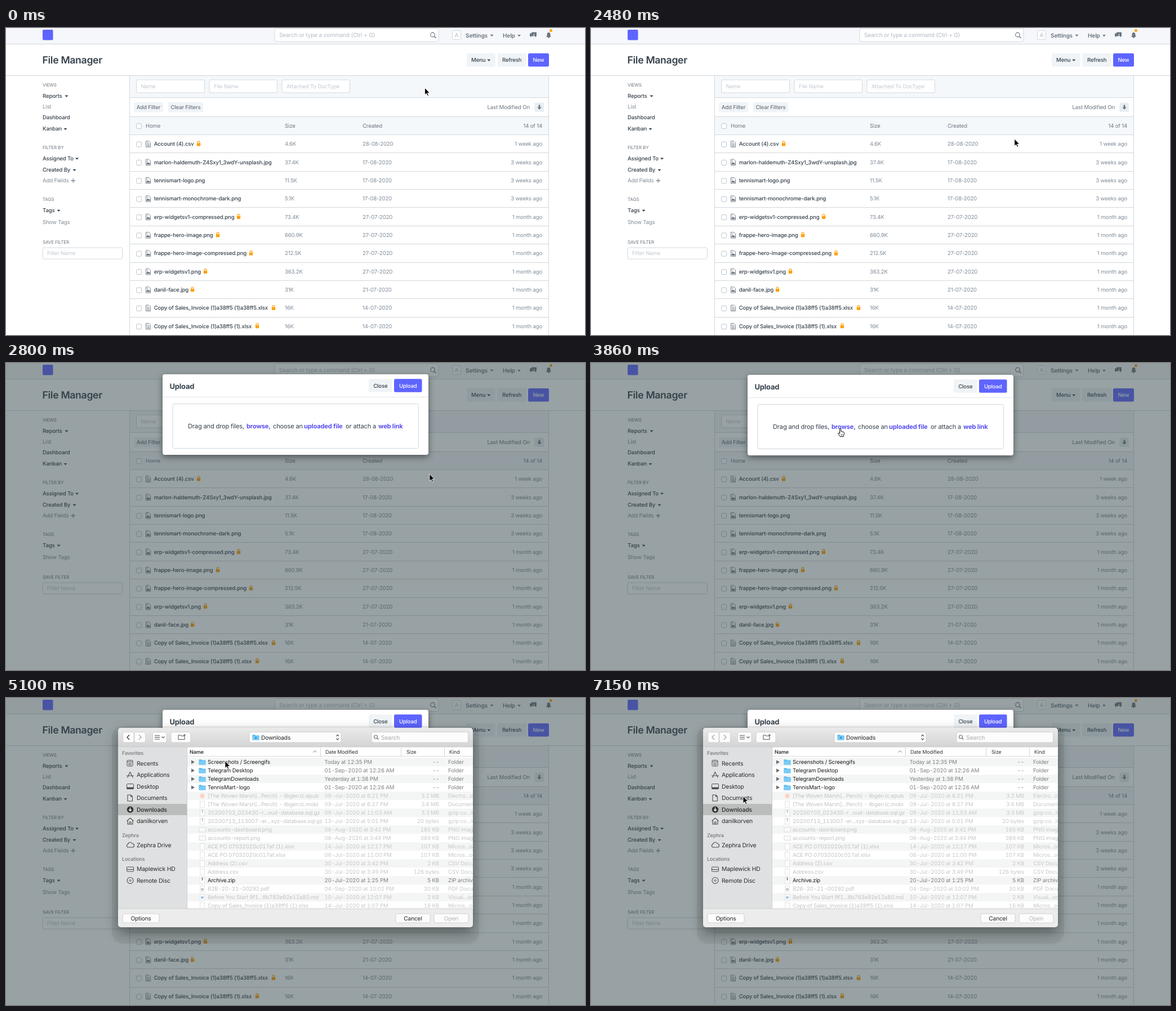
Recreate the animation shown at these times as an HTML page. Size 1028 by 545 pixels, loop 8 s.

```html
<!DOCTYPE html>
<html lang="en">
<head>
<meta charset="utf-8">
<title>File Manager</title>
<style>
  html, body { margin: 0; width: 100%; height: 100%; overflow: hidden; background: #fff; }
  svg { display: block; width: 100vw; height: 100vh; }
  text {
    font-family: Inter, "Open Sans", sans-serif; letter-spacing: -0.017em;
    white-space: pre; text-rendering: geometricPrecision;
  }
  .tab text { font-variant-numeric: tabular-nums; }
  #menuBox { filter: drop-shadow(0 4px 5px rgba(0,0,0,.22)); }
  #modalBox { filter: drop-shadow(0 4px 6px rgba(0,0,0,.45)); }
  #dialogBox { filter: drop-shadow(0 9px 11px rgba(0,0,0,.4)); }
</style>
</head>
<body>
<svg id="stage" viewBox="0 0 1028 545" preserveAspectRatio="none" xmlns="http://www.w3.org/2000/svg"></svg>
<script>
const DARK = '#36414c', GREY = '#7f8c99', SLATE = '#6c7680', LINE = '#d1d8dd',
      PALE = '#f0f4f7', BLUE = '#5e64ff', BAND = '#f5f8fb', HINT = '#c3cad1', ORANGE = '#ffa00a';

// y is the vertical centre of the text
const text = (x, y, str, fill = DARK, size = 9.6, weight = 400, anchor = 'start') =>
  `<text x="${x}" y="${(y + size * 0.36).toFixed(2)}" fill="${fill}" font-size="${size}" font-weight="${weight}" text-anchor="${anchor}">${str}</text>`;
const rect = (x, y, x2, y2, fill, r = 0, stroke = 'none', extra = '') =>
  `<rect x="${x}" y="${y}" width="${x2 - x}" height="${y2 - y}" rx="${r}" fill="${fill}" stroke="${stroke}" ${extra}/>`;
const path = (d, fill = 'none', stroke = 'none', w = 1, extra = '') =>
  `<path d="${d}" fill="${fill}" stroke="${stroke}" stroke-width="${w}" ${extra}/>`;
const circle = (x, y, r, fill, stroke = 'none', w = 1) =>
  `<circle cx="${x}" cy="${y}" r="${r}" fill="${fill}" stroke="${stroke}" stroke-width="${w}"/>`;
const group = (id, body) => `<g id="${id}">${body}</g>`;
const hline = (x, x2, y, c = LINE) => path(`M${x} ${y}H${x2}`, 'none', c);
const caret = (x, y, c = DARK) => path(`M${x - 3} ${y - 1.3}h6l-3 3.2z`, c);
const field = (x, y, x2, y2, hint, size = 9.6, color = HINT) =>
  rect(x, y, x2, y2, '#fff', 2.5, LINE) + text(x + 8, (y + y2) / 2, hint, color, size);
const button = (id, x, y, x2, y2, label, fill = PALE, color = DARK, dx = 0) =>
  rect(x, y, x2, y2, fill, 2.5, 'none', id && `id="${id}"`) +
  text((x + x2) / 2 + dx, (y + y2) / 2, label, color, 9.6, 500, 'middle');
const lens = (x, y, r, c) => circle(x, y, r, 'none', c, 1.2) +
  path(`M${x + r * .7} ${y + r * .7}l${r * .9} ${r * .9}`, 'none', c, 1.4);

function navbar() {
  return rect(0, 0, 1028, 28, '#f5f7fa') + hline(0, 1028, 28.5) +
    rect(65, 3, 83.5, 21.5, BLUE, 2) +
    field(477, 1, 768, 24, 'Search or type a command (Ctrl + G)', 10.1, '#b3bbc3') +
    lens(757.5, 12, 3.8, SLATE) +
    rect(792.5, 4.5, 807.5, 20.5, '#fbfcfd', 2, LINE) + text(800, 12.8, 'A', '#b3bbc3', 9.6, 400, 'middle') +
    text(816, 13, 'Settings', SLATE, 10.1, 600) + caret(862.5, 13, SLATE) +
    text(882, 13, 'Help', SLATE, 10.1, 600) + caret(911, 13.4, SLATE) +
    path('M933 7.5h9v7h-1v2l-2-2h-1v-4h-5z', SLATE) + path('M930 9.5h7v5h-4l-2 2v-2h-1z', SLATE) +
    path('M959 16c1.5-1.5 1.5-2.5 1.5-4.5 0-5 6-5 6 0 0 2 0 3 1.5 4.5z', SLATE) +
    circle(963.5, 16.6, 1.3, SLATE) + circle(967.5, 4.5, 2.5, ORANGE);
}

function head() {
  return text(64.5, 57, 'File Manager', DARK, 17.6, 600) + hline(0, 1028, 84.5) +
    button('menuBtn', 818, 45, 868.5, 68.5, 'Menu', PALE, DARK, -4.5) + caret(857.3, 57) +
    button('refreshBtn', 872.5, 45, 924, 68.5, 'Refresh') +
    button('', 927, 45, 964, 68.5, 'New', BLUE, '#fff');
}

function sidebar() {
  // y, label, caret x; entries without a third value are muted
  const items = [[120.5, 'Reports', 107.5], [139.7, 'List'], [158.8, 'Dashboard', 0], [179, 'Kanban', 105.5],
    [231.5, 'Assigned To', 126], [251.8, 'Created By', 121.5], [271, 'Add Fields'],
    [323.7, 'Tags', 93.5], [345, 'Show Tags']];
  const titles = [[101.5, 'VIEWS'], [212.5, 'FILTER BY'], [304.5, 'TAGS'], [380.5, 'SAVE FILTER']];
  return titles.map(([y, s]) => text(65, y, s, SLATE, 8)).join('') +
    items.map(([y, s, cx]) => {
      const muted = cx === undefined;
      return text(65, y, s, muted ? GREY : DARK, 9.6, muted ? 400 : 500) + (cx ? caret(cx, y + .3) : '');
    }).join('') +
    path('M115.5 271h7.5m-3.75-3.75v7.5', 'none', GREY, 1.3) +
    field(65, 390, 206.5, 410, 'Filter Name');
}

const checkbox = y => rect(231.7, y - 4.3, 240.7, y + 4.7, '#fff', 2, '#b9c2ca');
const lock = (x, y) => rect(x - 3.2, y - 1.2, x + 3.2, y + 4, ORANGE, .8) +
  path(`M${x - 2} ${y - 1}v-1.3a2 2 0 0 1 4 0v1.3`, 'none', ORANGE, 1.2);
function fileIcon(y, image) {
  const page = path(`M248.5 ${y - 5}h5l3 3v7.5h-8z`, 'none', SLATE, .9);
  return page + (image
    ? path(`M249.5 ${y + 4}v-1.5l2-3 1.7 2 1-1 1.4 2v1.5z`, SLATE) + circle(251, y - 2, .8, SLATE)
    : path(`M250 ${y - 2}h3m-3 2h5m-5 2h5m-5 1.8h5`, 'none', SLATE, .8));
}

// name, lock x, size, date, age
const files = [
  ['Account (4).csv', 342, '4.6K', '28-08-2020', '1 week ago'],
  ['marlon-haldemuth-Z4Sxy1_3wdY-unsplash.jpg', 0, '37.4K', '17-08-2020', '3 weeks ago'],
  ['tennismart-logo.png', 0, '11.5K', '17-08-2020', '3 weeks ago'],
  ['tennismart-monochrome-dark.png', 0, '5.1K', '17-08-2020', '3 weeks ago'],
  ['erp-widgetsv1-compressed.png', 413, '73.4K', '27-07-2020', '1 month ago'],
  ['frappe-hero-image.png', 376, '660.9K', '27-07-2020', '1 month ago'],
  ['frappe-hero-image-compressed.png', 435, '212.5K', '27-07-2020', '1 month ago'],
  ['erp-widgetsv1.png', 354, '363.2K', '27-07-2020', '1 month ago'],
  ['danil-face.jpg', 331, '31K', '21-07-2020', '1 month ago'],
  ['Copy of Sales_Invoice (1)a38ff5 (1)a38ff5.xlsx', 475, '16K', '14-07-2020', '1 month ago'],
  ['Copy of Sales_Invoice (1)a38ff5 (1).xlsx', 446, '16K', '14-07-2020', '1 month ago']];

function list() {
  const rows = files.map(([name, lockX, size, date, age], i) => {
    const y = 205.8 + i * 32.35;
    return checkbox(y + .6) + fileIcon(y, /png|jpg/.test(name)) + text(262.7, y, name, DARK, 9.6, 500) +
      (lockX ? lock(lockX, y - .3) : '') + text(495, y, size, GREY) + text(633, y, date, GREY) +
      text(952, y, age, GREY, 9.6, 400, 'end') + hline(219, 964, Math.round(y + 15.6) + .5);
  }).join('');
  return rect(219, 85, 964, 123, BAND) + rect(219, 158, 964, 189, BAND) +
    [123.5, 157.5, 189.5].map(y => hline(219, 964, y)).join('') +
    path('M219.5 85V545M963.5 85V545', 'none', LINE) +
    field(231.5, 92, 352.5, 115, 'Name') + field(361, 92, 481.5, 115, 'File Name') +
    field(490, 92, 610.5, 115, 'Attached To DocType') +
    button('', 227, 132, 279, 149.5, 'Add Filter', PALE, SLATE) +
    button('', 288, 132, 350, 149.5, 'Clear Filters', PALE, SLATE) +
    text(930, 141, 'Last Modified On', SLATE, 9.7, 400, 'end') +
    rect(938.5, 132.5, 955, 149, '#e9eef2', 2) +
    path('M945.7 136.5h2.6v4.2h2.4l-3.7 4-3.7-4h2.4z', SLATE) +
    checkbox(174) + text(248, 174, 'Home', SLATE) + text(495, 174, 'Size', SLATE) +
    text(633, 174, 'Created', SLATE) + text(952, 174, '14 of 14', SLATE, 9.6, 400, 'end') + rows;
}

function menu() {
  const items = ['Home', 'New Folder', 'Toggle Grid View', 'Import Zip', 'Import', 'User Permissions',
    'Role Permissions Manager', 'Customize', 'Toggle Sidebar', 'Share URL', 'Edit DocType'];
  const keys = { 7: 'J', 8: 'K', 9: 'L' };
  return rect(712, 70, 868.5, 464, '#fff', 3, 'none', 'id="menuBox"') + hline(712, 868, 213.5) +
    items.map((s, i) => text(723, 89 + i * 35.75, s, DARK, 9.6, 500) +
      (keys[i] ? text(857, 89 + i * 35.75, '⌘+' + keys[i], GREY, 9.6, 400, 'end') : '')).join('') +
    rect(861, 72, 867, 427, '#000', 3, 'none', 'id="thumb"');
}

function modal() {
  const parts = [[323, 'Drag and drop files,'], [427, 'browse,', 1], [474, 'choose an'],
    [529, 'uploaded file', 1], [603, 'or attach a'], [661, 'web link', 1]];
  return rect(278, 21, 750, 164, '#fff', 4, 'none', 'id="modalBox"') + hline(278, 750, 61.5, '#e1e6ea') +
    text(290.5, 42.3, 'Upload', DARK, 13, 700) +
    button('', 644, 29.3, 685.5, 52.8, 'Close') + button('', 689, 29.3, 738.5, 52.8, 'Upload', BLUE, '#fff') +
    rect(296, 73.5, 732.5, 152.5, '#fff', 3, LINE) +
    parts.map(([x, s, link]) => text(x, 113.3, s, link ? '#5a50f0' : DARK, 11.15, link ? 700 : 400)).join('');
}

const entries = `Screenshots / Screengifs|Today at 12:35 PM|--|Folder
Telegram Desktop|01-Sep-2020 at 12:26 AM|--|Folder
TelegramDownloads|Yesterday at 1:38 PM|--|Folder
TennisMart-logo|01-Sep-2020 at 12:26 AM|--|Folder
[The Woven Marsh]...Perch) - libgen.lc.epub|09-Jul-2020 at 8:21 PM|3.2 MB|Electro...ook
[The Woven Marsh]...Perch) - libgen.lc.mobi|09-Jul-2020 at 8:27 PM|3.6 MB|Document
20200703_023430-r...oud-database.sql.gz|09-Jul-2020 at 11:03 AM|3.3 MB|gzip co...ive
20200713_113007-er...xyz-database.sql.gz|13-Jul-2020 at 5:01 PM|20 bytes|gzip co...ive
accounts-dashboard.png|06-Aug-2020 at 3:41 PM|185 KB|PNG image
accounts-report.png|06-Aug-2020 at 3:44 PM|389 KB|PNG image
ACE PO 07032020c017af (1).xlsx|14-Jul-2020 at 12:17 PM|107 KB|Micros...ook
ACE PO 07032020c017af.xlsx|06-Jul-2020 at 11:00 PM|107 KB|Micros...ook
Address (2).csv|30-Jul-2020 at 3:42 PM|2 KB|CSV Document
Address.csv|30-Jul-2020 at 3:49 PM|126 bytes|CSV Document
Archive.zip|20-Jul-2020 at 1:25 PM|5 KB|ZIP archive
B2B-20-21-00292.pdf|04-Sep-2020 at 10:02 PM|30 KB|PDF Document
Before You Start 9f1...8b763e92e12a80.md|10-Jul-2020 at 12:07 PM|2 KB|Visual...ocu
Copy of Sales_Invoice (1)a38ff5 (1).xlsx|14-Jul-2020 at 1:07 PM|16 KB|Micros...ook`.split('\n').map(l => l.split('|'));

const folder = (x, y) => path(`M${x - 6} ${y - 4.5}h4.5l1 1.2h6.5v8h-12z`, '#58b9ee') +
  rect(x - 6, y - 2, x + 6, y + 4.7, '#7accf5', .8);

function entryIcon(name, y) {
  if (/epub/.test(name)) return circle(348.5, y, 4, '#fbd3bb');
  if (/png/.test(name)) return rect(343, y - 4, 354.5, y + 4, '#fafafa', 0, '#dcdcdc');
  const page = rect(344.5, y - 5.5, 352.5, y + 5.5, '#fdfdfd', 0, '#dedede', 'stroke-width=".8"');
  if (/gz|zip/.test(name)) return page + path(`M348.5 ${y - 5}v5`, 'none', /zip/.test(name) ? '#555' : '#aaa', 1.3);
  if (/pdf/.test(name)) return page + circle(348.5, y + 1, 2.5, '#c2c5ca');
  if (/md/.test(name)) return page + rect(346.5, y - 1.5, 350.5, y + 2.5, '#8fc0ea');
  return page;
}

function browser() {
  const rows = entries.map(([name, date, size, kind], i) => {
    const y = 113.7 + i * 15, dir = kind === 'Folder', on = dir || /zip/.test(name);
    const a = on ? '#1d1d1d' : '#c3c3c3', b = on ? '#808080' : '#c8c8c8';
    return (i % 2 ? '' : rect(322, y - 7.5, 829, y + 7.5, '#f4f5f5')) +
      (dir ? path(`M329 ${y - 3.5}l6 3.5l-6 3.5z`, '#6e6e6e') + folder(348.5, y) : entryIcon(name, y)) +
      text(358, y, name, a, 9.7) + text(565.5, y, date, b, 9.7) +
      text(769, y, size, b, 9.7, 400, 'end') + text(785, y, kind, b, 9.7);
  }).join('');
  const heads = [[326, 'Name'], [567, 'Date Modified'], [711, 'Size'], [787, 'Kind']];
  return `<g clip-path="url(#pane)" class="tab">` + rect(322, 87, 829, 374, '#fff') + rows +
    hline(322, 829, 103.5, '#d9d9d9') + path('M558.5 88v15M701.5 88v15M778.5 88v15', 'none', '#d4d4d4') +
    heads.map(([x, s], i) => text(x, 95.3, s, '#333', 9, i ? 400 : 600)).join('') +
    path('M545.5 96.5l3-3 3 3', 'none', '#777') + '</g>';
}

function places() {
  const c = '#4c4c4c', ink = d => path(d, 'none', c, 1.1);
  const labels = [[98, 'Favorites'], [244, 'Zephra'], [286, 'Locations']];
  const items = [
    [116, 'Recents', rect(215, 110.5, 225, 121, 'none', 1.5, c) + ink('M215 113h10M217 116h6M217 118.5h6')],
    [136.5, 'Applications', ink('M220.5 131l-5 10.5M220 131l5.5 10.5M214 138h13')],
    [157, 'Desktop', rect(214.5, 152.5, 226.5, 161.5, 'none', 1, c) + rect(214.5, 158.5, 226.5, 161.5, c)],
    [177.5, 'Documents', ink('M216 172h5.5l3 3v8h-8.5zM221.5 172v3h3')],
    [198, 'Downloads', circle(220.5, 198, 5.8, '#333') + path('M220.5 194.5v6m-2.5-2.5l2.5 2.5 2.5-2.5', 'none', '#fff', 1.3)],
    [218.5, 'danilkorven', ink('M214.5 218.5l6-5.5 6 5.5M216 217.5v6.5h9v-6.5M219.2 224v-4h2.6v4')],
    [261, 'Zephra Drive', ink('M217 265a2.8 2.8 0 0 1-.5-5.5 4.2 4.2 0 0 1 7.8-1 3.3 3.3 0 0 1 .7 6.5z')],
    [303.7, 'Maplewick HD', rect(214.5, 300, 226.5, 308, 'none', 1, c) + ink('M214.5 304.5h12')],
    [324.2, 'Remote Disc', circle(220.5, 324, 5.5, 'none', c, 1.1) + circle(220.5, 324, 1.5, 'none', c)]];
  return rect(199, 188, 321, 208, '#bbbcbc') +
    labels.map(([y, s]) => text(206, y + .2, s, '#757575', 9, 500)).join('') +
    items.map(([y, s, icon]) => icon + text(232, y, s, '#2b2b2b', 10.4, s === 'Downloads' ? 500 : 400)).join('');
}

function dialog() {
  const box = (x, x2, y = 60.5, y2 = 79) => rect(x, y, x2, y2, '#fcfcfc', 3, '#cbcacb', 'stroke-width=".8"');
  const tool = '#5f5f5f';
  const push = (x, x2, s, c) => box(x, x2, 383, 399) + text((x + x2) / 2, 391.2, s, c, 10.2, 400, 'middle');
  return rect(188, 50, 840, 436, '#000', 20, 'none', 'opacity=".06"') +
    rect(199, 53, 829, 407, '#ececec', 5, 'none', 'id="dialogBox"') +
    path('M199 87V58a5 5 0 0 1 5-5H824a5 5 0 0 1 5 5V87z', 'url(#bar)') + hline(199, 829, 87, '#c6c5c6') +
    rect(199, 87.5, 321.5, 374, '#dfe0e1') + path('M321.5 87.5V374', 'none', '#cfcfcf') +
    box(207.5, 227) + box(228, 247.5) + box(260.5, 285) + box(293, 328) + box(432, 595) + box(649, 820.5) +
    path('M219 65.5l-4 4.2 4 4.2', 'none', '#444', 1.4, 'id="back"') +
    path('M236 65.5l4 4.2-4 4.2', 'none', '#a9a9a9', 1.4) +
    path('M264 66.5h9M264 69.7h9M264 73h9M276.5 68.5l2.5 2.5 2.5-2.5', 'none', tool, 1.2) +
    path('M306 73.5v-7.5h4l1 1.3h6v6.2zM317 64v4M315 66h4', 'none', tool, 1.1) +
    folder(443.5, 69.7) + circle(443.5, 70.8, 2, '#3596cf') + text(453, 70, 'Downloads', '#222', 10.2) +
    path('M586.5 68l2.2-2.8 2.2 2.8M586.5 71.5l2.2 2.8 2.2-2.8', 'none', '#444', 1.2) +
    lens(656.5, 69, 3, '#777') + text(666, 70, 'Search', '#ababab', 10.3) +
    places() + browser() + hline(199, 829, 374, '#cfcfcf') +
    push(207, 272, 'Options', '#222') + push(692, 753, 'Cancel', '#222') + push(760, 821, 'Open', '#b4b4b4');
}

const defs = `<defs>
  <linearGradient id="bar" x2="0" y2="1"><stop stop-color="#ebeaeb"/><stop offset="1" stop-color="#d5d4d5"/></linearGradient>
  <clipPath id="pane"><rect x="322" y="87.5" width="507" height="286.5"/></clipPath></defs>`;
const pointer = group('arrow', path('M0 0V12.6l2.9-2.7 2 4.5 2-.9-2-4.4h4z', '#000', '#fff', .9)) +
  group('hand', path('M-1.3 .9a1.2 1.2 0 0 1 2.4 0v4l4.2 .9c1.2 .3 1.5 1 1.3 2.2l-.8 3.6-.7 2.3h-5.6l-3.5-5.2c-.6-1.1 .6-1.9 1.5-1.1l1.2 1.2z',
    '#fff', '#000', 1) + path('M1.3 9.5v2.5M3.2 9.5v2.5', 'none', '#000', .7));

const stage = document.getElementById('stage');
stage.innerHTML = defs + rect(0, 0, 1028, 545, '#fff') + navbar() + head() + sidebar() + list() +
  group('menu', menu()) + rect(0, 0, 1028, 545, '#334448', 0, 'none', 'id="shade"') +
  group('modal', modal()) + group('dialog', dialog()) + group('cursor', pointer);
const $ = Object.fromEntries([...stage.querySelectorAll('[id]')].map(el => [el.id, el]));
const show = (el, on) => el.setAttribute('display', on ? 'inline' : 'none');
const set = (el, name, value) => el.setAttribute(name, value);

// start, end, steps, then from / control / to points of a curve
const moves = [
  [360, 891, 7, [743.5, 106.2], [960, 55], [856, 53.5]],
  [1790, 2220, 6, [856, 53.5], [705, 120], [751.8, 197]],
  [3390, 4040, 8, [751.8, 197], [560, 122], [389, 112]],
  [5990, 6790, 10, [389, 112], [315, 128], [270, 174.5]]];

function cursorAt(t) {
  let pos = moves[0][3];
  for (const [start, end, steps, a, c, b] of moves) {
    if (t < start) break;
    const k = Math.min(steps, Math.floor((t - start) / (end - start) * (steps - 1) + 1e-6) + 1) / steps;
    const p = k * k * (3 - 2 * k), q = 1 - p;
    pos = [0, 1].map(i => q * q * a[i] + 2 * p * q * c[i] + p * p * b[i]);
  }
  return pos;
}

// held states: start, ...values
const stateAt = (table, t) => table.filter(s => s[0] <= t).pop();
const modalSteps = [[0, 0, 0], [2690, -14, .87], [2800, -1, 1], [2920, 0, 1]];
const dialogSteps = [[0, 1, 0], [4930, 1 / 3, .5], [5020, .8, .87], [5100, 1, 1]];
const thumbSteps = [[0, .5], [1520, .28], [1610, 0]];

function draw(t) {
  const [x, y] = cursorAt(t);
  const open = t >= 980 && t < 2480;
  const onHead = y > 45 && y < 68;
  const onMenu = onHead && x > 818 && x < 868, onRefresh = onHead && x > 872 && x < 924;
  const onDrop = t > 3390 && t < 4580 && x < 732 && y < 152;
  const hand = onMenu || onRefresh || open || onDrop;
  set($.cursor, 'transform', `translate(${x.toFixed(2)} ${y.toFixed(2)})`);
  show($.hand, hand);
  show($.arrow, !hand);
  set($.menuBtn, 'fill', open ? '#c8d5de' : onMenu ? '#d9e3ea' : PALE);
  set($.refreshBtn, 'fill', onRefresh ? '#d9e3ea' : PALE);
  show($.menu, open);
  set($.thumb, 'opacity', stateAt(thumbSteps, t)[1]);

  const [, dy, fade] = stateAt(modalSteps, t);
  show($.shade, fade);
  show($.modal, fade);
  set($.shade, 'opacity', fade / 2);
  set($.modal, 'opacity', fade);
  set($.modal, 'transform', `translate(0 ${dy})`);

  const [, scale, alpha] = stateAt(dialogSteps, t);
  show($.dialog, alpha);
  set($.dialog, 'opacity', alpha);
  set($.dialog, 'transform', `translate(514 230) scale(${scale}) translate(-514 -230)`);
  set($.back, 'stroke', t < 5520 ? '#444' : '#a9a9a9');
}

const began = performance.now();
function tick() {
  draw((performance.now() - began) % 8000);
  requestAnimationFrame(tick);
}
tick();
</script>
</body>
</html>
```
